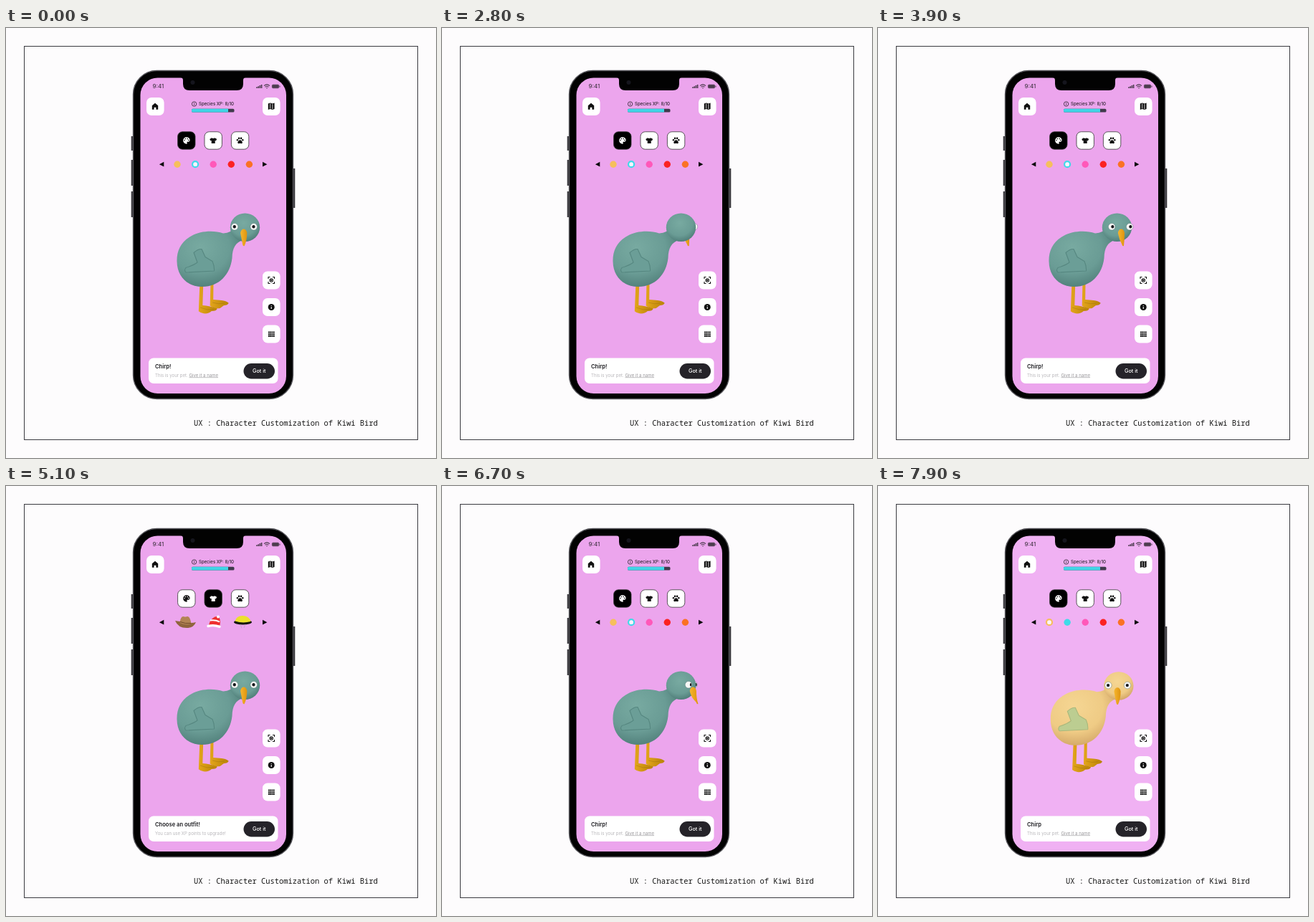
These frames come from a looping animation (600x600 px, 8000 ms). An HTML page:

```html
<!DOCTYPE html>
<html lang="en">
<head>
<meta charset="utf-8">
<title>Kiwi bird customization</title>
<style>
html, body { margin: 0; height: 100%; overflow: hidden; background: #fdfcfd; }
svg { display: block; width: 100vw; height: 100vh; font-family: Inter, Roboto, sans-serif; }
.mono { font: 10.45px "Noto Sans Mono", "DejaVu Sans Mono", monospace; fill: #161616; }
.tab rect { fill: #fff; stroke: #333; stroke-width: .8; }
.tab .ink { fill: #111; }
.tab .hole { fill: #fff; }
.tab.on rect, .tab.on .hole { fill: #000; }
.tab.on .ink { fill: #fff; }
.skin0 { stop-color: var(--light); }
.skin1 { stop-color: var(--mid); }
.skin2 { stop-color: var(--dark); }
</style>
</head>
<body>
<svg id="stage" viewBox="0 0 600 600">
  <defs>
    <radialGradient id="bodySkin" cx=".36" cy=".34" r=".72">
      <stop class="skin0" offset="0"/><stop class="skin1" offset=".6"/><stop class="skin2" offset="1"/>
    </radialGradient>
    <radialGradient id="headSkin" cx=".45" cy=".35" r=".68">
      <stop class="skin0" offset="0"/><stop class="skin1" offset=".65"/><stop class="skin2" offset="1"/>
    </radialGradient>
    <linearGradient id="leg"><stop stop-color="#e3a51b"/><stop offset="1" stop-color="#b98208"/></linearGradient>
    <linearGradient id="beakFill"><stop stop-color="#f7b52d"/><stop offset="1" stop-color="#dd9410"/></linearGradient>
  </defs>

  <rect x="25.5" y="25.5" width="549" height="549" fill="none" stroke="#3a3a40"/>
  <text class="mono" x="262" y="555">UX : Character Customization of Kiwi Bird</text>

  <!-- phone -->
  <path d="M176 151v20M176 184v36M176 228v36M402 196v55" stroke="#3a393e" stroke-width="2.6"/>
  <rect x="177.5" y="59.5" width="223" height="458" rx="33" fill="#020202" stroke="#55545a" stroke-width="1.4"/>
  <rect id="screen" x="187.5" y="69.5" width="203.5" height="440.5" rx="24"/>
  <path d="M243 69h92q-4 0-4 4v5q0 9-9 9h-66q-9 0-9-9v-5q0-4-4-4z" fill="#020202"/>
  <circle cx="260.5" cy="76" r="3" fill="#15151d"/>
  <text x="204.5" y="84" font-size="8" font-weight="500" fill="#4c3c4e">9:41</text>
  <g fill="none" stroke="#4c3c4e">
    <path d="M350 84v-1.8M352.2 84v-2.8M354.4 84v-3.9M356.6 84v-5" stroke-width="1.6"/>
    <path d="M360 80.6q4-3.4 8 0M361.6 82.3q2.4-2 4.8 0M363.2 83.8h1.6" stroke-width="1.1"/>
    <rect x="371.4" y="79.2" width="9.2" height="4.6" rx="1.2" fill="#4c3c4e" stroke-width=".8"/>
    <path d="M382 80.6v2"/>
  </g>

  <!-- top bar -->
  <g fill="#fff" id="squares"></g>
  <path d="M208 104.7l4.2 3.6v5.4h-2.8v-3h-2.8v3h-2.8v-5.4z" fill="#111"/>
  <path d="M365.8 105.6l2.8-1 3.2 1 2.8-1v8.3l-2.8 1-3.2-1-2.8 1z" fill="#111"/>
  <path d="M368.6 105.4v7M371.8 106.2v7" stroke="#fff" stroke-width=".8"/>
  <g fill="none" stroke="#2c222e" stroke-width=".8">
    <circle cx="262.6" cy="106" r="3.2"/><path d="M262.6 105.4v2.3M262.6 104v.8"/>
  </g>
  <text x="269" y="108.2" font-size="6.1" font-weight="500" fill="#2c222e" id="xp">Species XP: 8/10</text>
  <rect x="259" y="112.8" width="59.5" height="4.8" rx="1.6" fill="#403a4c"/>
  <path d="M260.6 112.8H310v4.8h-49.4q-1.6 0-1.6-1.6v-1.6q0-1.6 1.6-1.6z" fill="#40d4e6"/>

  <!-- tabs and choices -->
  <g id="tabs"></g>
  <path d="M220.3 186.8v6.8l-6.4-3.4zM358 186.8v6.8l6.4-3.4z" fill="#0c0c0c"/>
  <g id="colors"></g>
  <g id="hats">
    <path d="M236 188q5 1 8 1l14 2q4 0 7-1-3 8-13 8-12 0-16-10z" fill="#8f653d"/>
    <path d="M242.500 191q1-9 5-9 3 1 5 0 4-1 6 10-8 3-16-1z" fill="#b28454"/>
    <path d="M243 189.500q7 3 15 2" stroke="#70492a" fill="none"/>
    <path d="M283 194q2-11 13-12.500 4 4 2.500 13z" fill="#ee3030"/>
    <path d="M285 187.500q7-1 13 2" stroke="#fff" stroke-width="2" fill="none"/>
    <path d="M282 195.500q8-2 16 .8" stroke="#fff" stroke-width="3.400" stroke-linecap="round" fill="none"/>
    <circle cx="296" cy="182.500" r="2" fill="#fff"/>
    <ellipse cx="330.500" cy="190" rx="12.500" ry="3.500" fill="#17170f"/>
    <path d="M319.500 188.500q2-7.500 10.500-7.500 9 0 11.500 8-11 3-22-.5z" fill="#ece02c"/>
    <path d="M327 193l2 5.500M334 193l-2 5" stroke="#b9a9bb" stroke-width=".8"/>
  </g>

  <!-- side icons -->
  <g fill="none" stroke="#111" stroke-width="1.100">
    <path d="M366 350v-2.500h2.500M372 347.500h2.500v2.500M374.500 354v2.500H372M368.500 356.500H366V354"/>
    <circle cx="370.250" cy="352" r="2.200"/>
    <circle cx="370.250" cy="352" r=".6"/>
  </g>
  <circle cx="370.250" cy="389.500" r="4.500" fill="#111"/>
  <path d="M370.250 389v3M370.250 387v1.100" stroke="#fff" stroke-width="1.100"/>
  <path d="M366 424.500h9M366 427.200h9M366 429.900h9" stroke="#111" stroke-width="2.100" stroke-dasharray="1.800 .5"/>

  <!-- bird -->
  <g id="bird">
    <path d="M285.500 354h4l-.3 25 9 .8q9 .7 12.500 4-1 3-7 3.500l-5 3.700q-9 1-14-3.500z" fill="url(#leg)"/>
    <path d="M270.500 354h4.800l-1 33q10 .5 20.500 4.500-1 3.500-8 3.500-4 4-11 3.300-5-1-7-3z" fill="url(#leg)"/>
    <path d="M271 390q9 4 19 3M288 383q8 3 17 1" stroke="#8d640c" stroke-width=".7" fill="none" opacity=".5"/>
    <path d="M317 279Q315 286 303 286.500C290 282 271 283 259 290 244 298 238 311 238.500 326 239 347 253 361 274 361 297 361 313 344 315.500 321 316 307 320 299 331 296z" fill="url(#bodySkin)"/>
    <path id="wing" d="M262 313.500Q268 308 273 308.500L278 319.500 288 325.500Q291 332 290.500 339L251 341Q248 338 251 334.500 262 331 267 327z" stroke-width="1.100" stroke-linejoin="round"/>
    <g id="back"></g>
    <ellipse cx="333.500" cy="278.200" rx="20.700" ry="19.800" fill="url(#headSkin)"/>
    <g id="front"></g>
  </g>

  <!-- message -->
  <rect x="199" y="460.500" width="180.500" height="35.500" rx="7" fill="#fff"/>
  <text id="title" x="208" y="475" font-size="7.600" font-weight="600" fill="#1b1b1f"></text>
  <text id="note" x="208" y="486.500" font-size="6.070" fill="#b8b6ba"></text>
  <rect x="331.500" y="468" width="43.500" height="21.500" rx="10.750" fill="#252329"/>
  <text x="353.300" y="481.400" font-size="7.300" font-weight="500" fill="#fff" text-anchor="middle">Got it</text>
</svg>

<script>
const $ = id => document.getElementById(id);
const circle = (x, y, r, fill, more = '') => `<circle cx="${x}" cy="${y}" r="${r}" fill="${fill}" ${more}/>`;
const LOOP = 8000;

$('squares').innerHTML = [[196, 97], [358, 97], [358, 339.5], [358, 377], [358, 414.5]]
  .map(([x, y]) => `<rect x="${x}" y="${y}" width="24.6" height="25" rx="7"/>`).join('');

const dots = (list, cls) => list.map(([x, y, r]) => `<circle class="${cls}" cx="${x}" cy="${y}" r="${r}"/>`).join('');
const icons = [
  '<path class="ink" d="M0-4.700a4.700 4.700 0 0 0 0 9.400c1.200 0 1-1.100.7-1.600-.4-.8.2-1.300.8-1.300h1.100c1.400 0 2.200-1 2.200-2.200C4.800-2.800 2.700-4.700 0-4.700z"/>'
    + dots([[-2.8, -.2, .75], [-1.5, -2.5, .75], [1.4, -2.5, .75], [2.9, -.5, .75]], 'hole'),
  '<path class="ink" d="M-2-3.800Q0-2 2-3.800L5-2 3.700.5 2.500 0v4h-5V0l-1.200.5L-5-2z"/>',
  dots([[-3.700, -.7, 1.2], [-1.500, -3.1, 1.3], [1.500, -3.1, 1.3], [3.700, -.7, 1.2]], 'ink')
    + '<path class="ink" d="M0-.8c1.300 0 3.500 2.300 3.300 3.700-.3 1.800-2 1.100-3.300 1.100s-3 .7-3.300-1.100C-3.500 1.500-1.300-.8 0-.8z"/>'
];
$('tabs').innerHTML = icons.map((icon, i) =>
  `<g class="tab" transform="translate(${251.8 + i * 37.4} 157)"><rect x="-12.2" y="-12.2" width="24.4" height="24.4" rx="6.5"/>${icon}</g>`).join('');
const tabs = [...$('tabs').children];

const swatches = ['#f6bf5c', '#3fdbe8', '#ff58b9', '#fb2222', '#fa7224'];
const colorRow = picked => swatches.map((c, i) => {
  const x = 239 + i * 25.1;
  return i === picked ? circle(x, 190.2, 4, '#fff3ff', `stroke="${c}" stroke-width="2.2"`) : circle(x, 190.2, 4.7, c);
}).join('');

const skins = {
  teal: { light: '#78aaa1', mid: '#6a9c95', dark: '#4d7b76', wing: '#6b9e97', edge: '#568780' },
  yellow: { light: '#f5d693', mid: '#efcb85', dark: '#cfa264', wing: '#bccd91', edge: '#a9b87c' }
};

// Head yaw in degrees: one slow look over the shoulder, one quick glance.
function yaw(t) {
  const swing = (from, to, size) =>
    t > from && t < to ? size * Math.sin(Math.PI * (t - from) / (to - from)) ** 2 : 0;
  return -4 + swing(1800, 4200, 170) + swing(6500, 6900, 78);
}

function face(deg) {
  const rad = d => d * Math.PI / 180;
  const layers = { back: '', front: '' };
  const look = Math.sin(rad(deg)), ahead = Math.cos(rad(deg));
  const layer = depth => depth < 0 ? 'back' : 'front';

  for (const side of [-42, 42]) {
    const a = rad(deg + side);
    const x = 333.4 + 20 * Math.sin(a), y = 277.3;
    const pupil = ahead > -.2
      ? `<ellipse cx="${x + 3.2 * look}" cy="${y}" rx="${.8 + 1.3 * Math.max(0, ahead)}" ry="2.2" fill="#17171c"/>` : '';
    layers[layer(Math.cos(a))] += circle(x, y, 4.8, '#f7f7f5', 'stroke="#47696a" stroke-width=".4"') + pupil;
  }

  const b = 333 + 18 * look, tip = 333.4 + 24 * look;
  layers[layer(ahead)] += `<path fill="url(#beakFill)" d="M${b - 4.6} 286
    C${b - 4} 278.5 ${b + 4} 278.5 ${b + 4.6} 286 Q${b + 4.5} 296 ${tip + 1} 304
    Q${tip - 1} 305 ${tip - 1.6} 302 Q${b - 3} 295 ${b - 4.6} 286z"/>`;
  $('back').innerHTML = layers.back;
  $('front').innerHTML = layers.front;
}

let shown;
function draw(now) {
  requestAnimationFrame(draw);
  const t = Math.floor(now % LOOP / 100) * 100;
  if (t === shown) return;
  shown = t;

  const outfits = t >= 4200 && t < 5800;
  const yellow = t >= 7100;
  const skin = yellow ? skins.yellow : skins.teal;

  for (const key of ['light', 'mid', 'dark']) $('stage').style.setProperty('--' + key, skin[key]);
  $('wing').setAttribute('fill', skin.wing);
  $('wing').setAttribute('stroke', skin.edge);
  $('bird').setAttribute('transform', yellow ? 'translate(2.3 .8)' : '');
  $('screen').setAttribute('fill', yellow ? '#f0b1f3' : '#eca5ed');

  tabs.forEach((tab, i) => tab.classList.toggle('on', i === +outfits));
  $('hats').style.display = outfits ? '' : 'none';
  $('colors').innerHTML = outfits ? '' : colorRow(yellow ? 0 : 1);
  $('title').textContent = outfits ? 'Choose an outfit!' : yellow ? 'Chirp' : 'Chirp!';
  $('note').innerHTML = outfits ? 'You can use XP points to upgrade!'
    : 'This is your pet. <tspan fill="#99979b" text-decoration="underline">Give it a name</tspan>';
  face(yaw(t));
}
requestAnimationFrame(draw);
</script>
</body>
</html>
```
